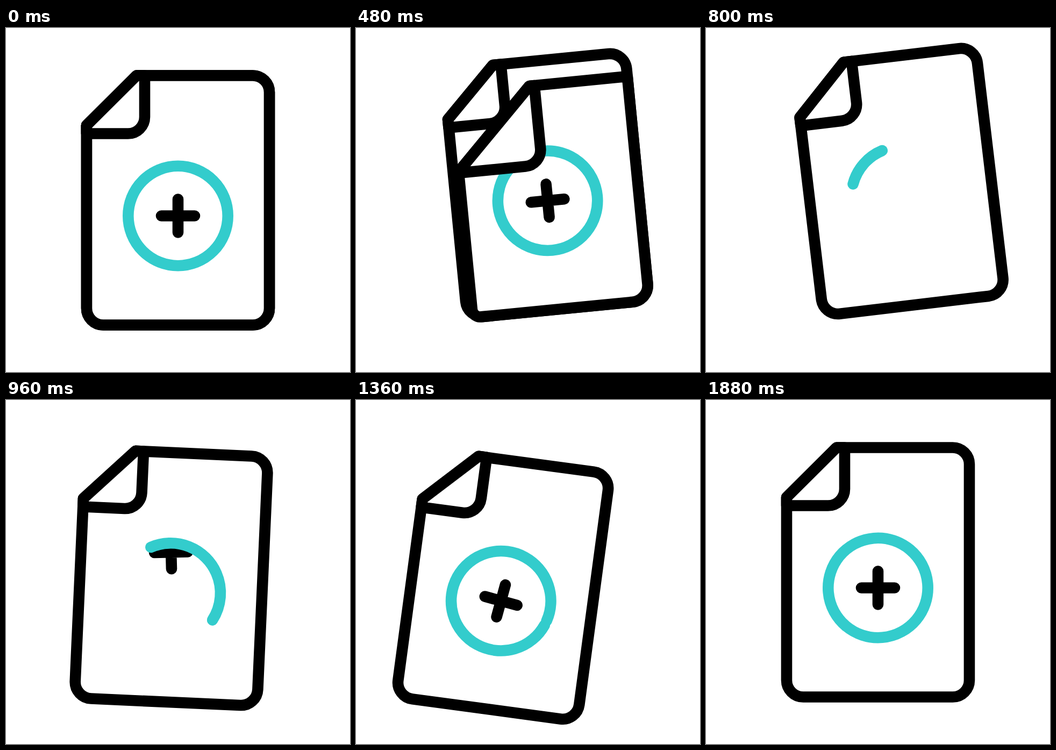
These frames come from a looping animation (640x640 px, 2 s). An HTML page without scripts:

```html
<!DOCTYPE html>
<html lang="en">
<head>
<meta charset="utf-8">
<title>New document</title>
<style>
  html, body { margin: 0; width: 100%; height: 100%; overflow: hidden; background: #fff; }
  svg { display: block; width: 100vw; height: 100vh; }
  .ink { fill: #fff; stroke: #000; stroke-width: 20.6; stroke-linecap: round; stroke-linejoin: round; }
  .ring { fill: none; stroke: #3cc; stroke-width: 20.6; stroke-linecap: round; }
</style>
</head>
<body>
<svg viewBox="0 0 640 640">
  <defs>
    <path id="sheet" d="M150 181L243 88.5H459A31 31 0 0 1 490 119.5V521.5A31 31 0 0 1 459 552.5H181A31 31 0 0 1 150 521.5Z"/>
    <path id="corner" d="M150 181L243 88.5H258V165.5A31 31 0 0 1 227 196.5H150Z"/>
    <path id="plus" d="M289 349.5H351M320 318.5V380.5"/>

    <!-- the sheet that peels away towards the bottom right -->
    <path id="peel">
      <animate attributeName="d" dur="2s" repeatCount="indefinite" calcMode="spline"
        keyTimes="0;.1;.24;.32;.385;1"
        keySplines="0 0 1 1;.5 0 .8 .45;.3 .2 .7 .7;.3 .35 .7 1;0 0 1 1"
        values="M150 181L243 88.5H459A31 31 0 0 1 490 119.5V521.5A31 31 0 0 1 459 552.5H181A31 31 0 0 1 150 521.5Z;
                M150 181L243 88.5H459A31 31 0 0 1 490 119.5V521.5A31 31 0 0 1 459 552.5H181A31 31 0 0 1 150 521.5Z;
                M160 279L306.4 133.2H490A0 0 0 0 1 490 133.2V521.5A31 31 0 0 1 459 552.5H175A15 15 0 0 1 160 537Z;
                M239 483.4L446.5 289.8H490A0 0 0 0 1 490 289.8V521.5A31 31 0 0 1 459 552.5H239A0 0 0 0 1 239 552.5Z;
                M459 552.5L490 521.5H490A0 0 0 0 1 490 521.5V521.5A31 31 0 0 1 459 552.5H459A0 0 0 0 1 459 552.5Z;
                M459 552.5L490 521.5H490A0 0 0 0 1 490 521.5V521.5A31 31 0 0 1 459 552.5H459A0 0 0 0 1 459 552.5Z"/>
    </path>
    <clipPath id="peelClip"><use href="#peel"/></clipPath>
    <clipPath id="ringClip"><circle cx="320" cy="349.5" r="92.7"/></clipPath>
  </defs>

  <g>
    <!-- sway: x, y and tilt ease separately -->
    <animateTransform attributeName="transform" type="translate" additive="sum" dur="2s" repeatCount="indefinite" calcMode="spline"
      keyTimes="0;.115;.38;.65;.95;1" values="0 0;0 0;41.7 0;-48.5 0;0 0;0 0"
      keySplines="0 0 1 1;.333 0 .1 1;.333 0 .2 1;.333 0 .1 1;0 0 1 1"/>
    <animateTransform attributeName="transform" type="translate" additive="sum" dur="2s" repeatCount="indefinite" calcMode="spline"
      keyTimes="0;.115;.38;.65;.95;1" values="0 0;0 0;0 -37;0 25.6;0 0;0 0"
      keySplines="0 0 1 1;.333 0 .2 1;.333 0 0 1;.333 0 .1 1;0 0 1 1"/>
    <animateTransform attributeName="transform" type="rotate" additive="sum" dur="2s" repeatCount="indefinite" calcMode="spline"
      keyTimes="0;.115;.38;.65;.95;1"
      values="0 320 320.5;0 320 320.5;-7.1 320 320.5;8 320 320.5;0 320 320.5;0 320 320.5"
      keySplines="0 0 1 1;.333 0 .15 1;.333 0 .15 1;.333 0 .1 1;0 0 1 1"/>

    <!-- fresh sheet -->
    <use href="#sheet" class="ink"/>
    <use href="#corner" class="ink"/>
    <g clip-path="url(#ringClip)">
      <g>
        <animateTransform attributeName="transform" type="translate" additive="sum" dur="2s" repeatCount="indefinite" calcMode="spline"
          keyTimes="0;.38;.65;1" values="-5 -150;-5 -150;0 0;0 0"
          keySplines="0 0 1 1;.333 0 .333 1;0 0 1 1"/>
        <animateTransform attributeName="transform" type="rotate" additive="sum" dur="2s" repeatCount="indefinite" calcMode="spline"
          keyTimes="0;.38;.65;.95;1"
          values="-16 320 349.5;-16 320 349.5;8 320 349.5;0 320 349.5;0 320 349.5"
          keySplines="0 0 1 1;.333 0 .333 1;.333 0 .1 1;0 0 1 1"/>
        <use href="#plus" class="ink"/>
      </g>
    </g>
    <circle class="ring" cx="320" cy="349.5" r="92.7" pathLength="360" visibility="hidden" stroke-dasharray="0 400">
      <animate attributeName="visibility" dur="2s" repeatCount="indefinite" calcMode="discrete"
        keyTimes="0;.305" values="hidden;visible"/>
      <animate attributeName="stroke-dasharray" dur="2s" repeatCount="indefinite" calcMode="spline"
        keyTimes="0;.302;.71;1" values="0 400;0 400;360 400;360 400"
        keySplines="0 0 1 1;.333 0 .667 1;0 0 1 1"/>
      <animateTransform attributeName="transform" type="rotate" dur="2s" repeatCount="indefinite"
        keyTimes="0;.3;.48;.68;.71;1"
        values="148 320 349.5;148 320 349.5;243.6 320 349.5;381 320 349.5;400 320 349.5;400 320 349.5"/>
    </circle>

    <!-- peeling sheet -->
    <g>
      <animate attributeName="visibility" dur="2s" repeatCount="indefinite" calcMode="discrete"
        keyTimes="0;.385" values="visible;hidden"/>
      <use href="#peel" class="ink"/>
      <g clip-path="url(#peelClip)">
        <circle class="ring" cx="320" cy="349.5" r="92.7"/>
        <use href="#plus" class="ink"/>
      </g>
      <path class="ink">
        <animate attributeName="d" dur="2s" repeatCount="indefinite" calcMode="spline"
          keyTimes="0;.1;.24;.32;.385;1"
          keySplines="0 0 1 1;.5 0 .8 .45;.3 .2 .7 .7;.3 .35 .7 1;0 0 1 1"
          values="M150 181L243 88.5H258V165.5A31 31 0 0 1 227 196.5H150Z;
                  M150 181L243 88.5H258V165.5A31 31 0 0 1 227 196.5H150Z;
                  M160 279L306.4 133.2H315.6V250.2A31 31 0 0 1 284.6 281.2H160Z;
                  M239 483.4L446.5 289.8H448V455.8A31 31 0 0 1 417 486.8H239Z;
                  M459 552.5L490 521.5H490V521.5A31 31 0 0 1 459 552.5H459Z;
                  M459 552.5L490 521.5H490V521.5A31 31 0 0 1 459 552.5H459Z"/>
      </path>
    </g>
  </g>
</svg>
</body>
</html>
```
